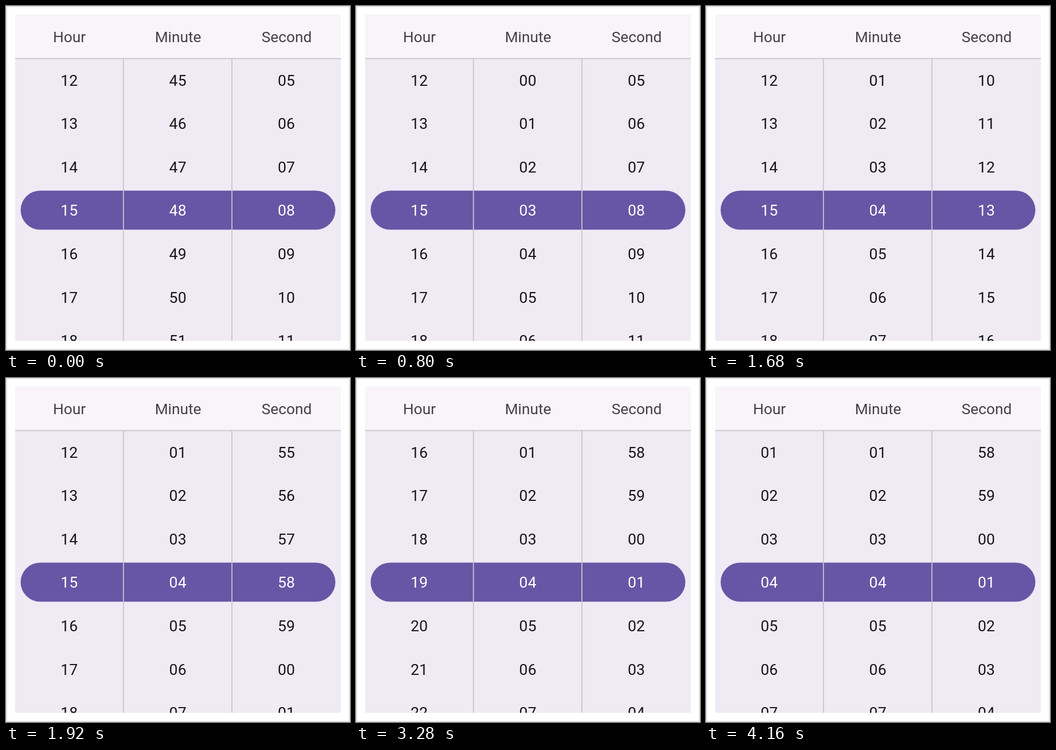
Write an HTML page that moves like this. It is 600x599 px and loops after 4.24 s.

```html
<!DOCTYPE html>
<html lang="en">
<head>
<meta charset="utf-8">
<title>Time picker</title>
<style>
  html, body { margin: 0; width: 100%; height: 100%; overflow: hidden; background: #fff; }
  svg { display: block; width: 600px; height: 599px; }
  text { font-family: Roboto, "Open Sans", sans-serif; text-anchor: middle; }
  .head { font-size: 26.3px; fill: #434048; }
  .num { font-size: 26.6px; letter-spacing: .2px; fill: #18171b; }
  .num.on { fill: #fff; }
  .line { fill: #c8c5cd; }
</style>
</head>
<body>
<svg viewBox="0 0 600 599">
  <defs><clipPath id="panel"><rect x="16" y="15" width="568" height="568"/></clipPath></defs>
  <rect x="1" y="1" width="598" height="597" fill="#fff" stroke="#e3e3e3" stroke-width="2"/>
  <g clip-path="url(#panel)">
    <rect x="16" y="15" width="568" height="568" fill="#efeaf4"/>
    <rect x="16" y="15" width="568" height="76" fill="#f8f4fa"/>
    <rect x="25.5" y="321.5" width="549" height="68" rx="34" fill="#6756a5"/>
    <rect class="line" x="16" y="90.6" width="568" height="1.8"/>
    <rect class="line" x="203.9" y="91" width="1.8" height="492"/>
    <rect class="line" x="393.2" y="91" width="1.8" height="492"/>
    <g id="wheels"></g>
  </g>
</svg>
<script>
const LOOP = 4240, STEP = 80;
const ROWS = 7, MIDDLE = 3, PITCH = 75.6, FIRST = 138.6;

// Each wheel turns once: `by` values, beginning at `begin` and lasting `span` ms
const columns = [
  { label: "Hour", size: 24, from: 15, by: 13, begin: 2880, span: 1120 },
  { label: "Minute", size: 60, from: 48, by: 16, begin: 400, span: 480 },
  { label: "Second", size: 60, from: 8, by: 53, begin: 1611, span: 361 }
];

const wheels = document.getElementById("wheels");

function addText(cls, x, y, value) {
  const el = document.createElementNS("http://www.w3.org/2000/svg", "text");
  el.setAttribute("class", cls);
  el.setAttribute("x", x);
  el.setAttribute("y", y);
  el.textContent = value;
  wheels.append(el);
  return el;
}

columns.forEach((col, c) => {
  const x = 110.3 + c * 189.4;
  addText("head", x + 0.4, 62.6, col.label);
  col.cells = Array.from({ length: ROWS }, (_, i) =>
    addText(i === MIDDLE ? "num on" : "num", x, FIRST + i * PITCH, ""));
});

function valueAt({ from, by, begin, span }, t) {
  const p = Math.min(1, Math.max(0, (t - begin) / span));
  return from + Math.round(by * p * p * (3 - 2 * p));
}

function draw(t) {
  for (const col of columns) {
    const value = valueAt(col, t);
    if (value === col.shown) continue;
    col.shown = value;
    col.cells.forEach((cell, i) => {
      const n = (value + i - MIDDLE + col.size) % col.size;
      cell.textContent = String(n).padStart(2, "0");
    });
  }
}

const start = performance.now();
function tick() {
  const t = (performance.now() - start) % LOOP;
  draw(Math.floor(t / STEP) * STEP);
  requestAnimationFrame(tick);
}
tick();
</script>
</body>
</html>
```
